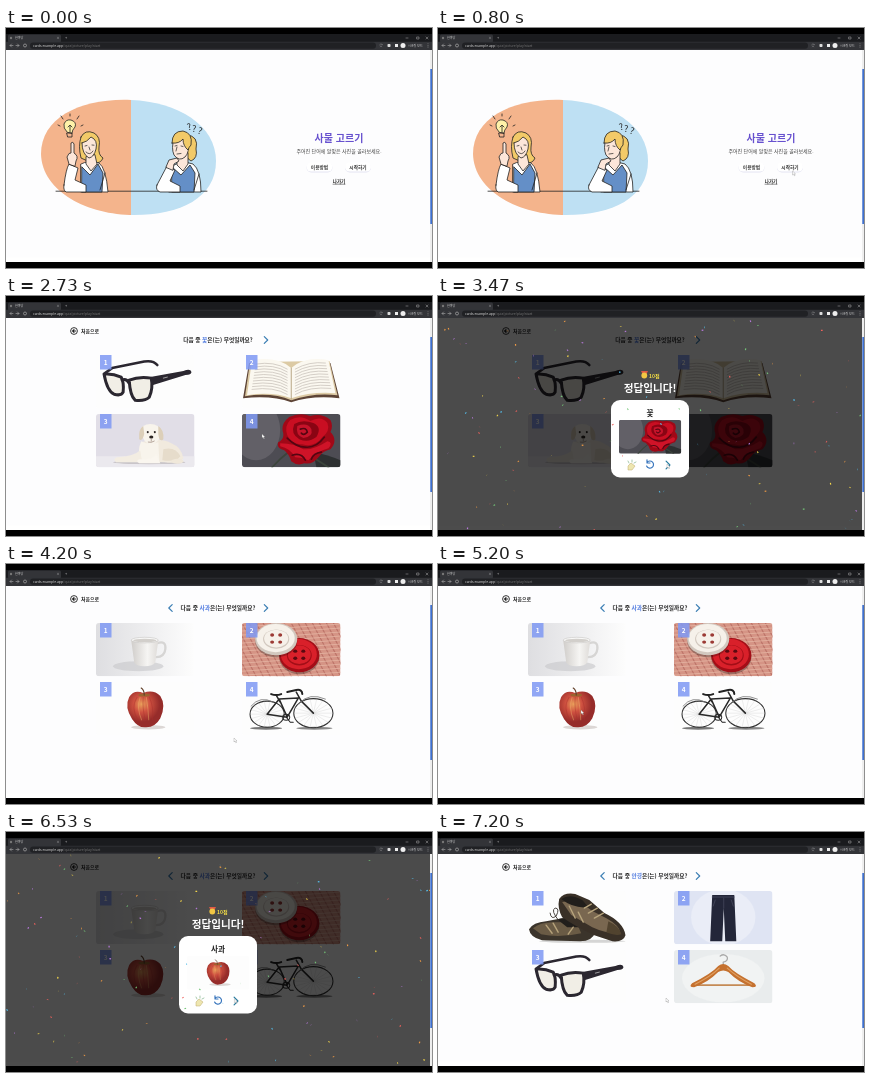
Write an HTML page that moves like this. It is 426 px wide and 240 px high and loops after 7270 ms.

```html
<!DOCTYPE html>
<html lang="ko">
<meta charset="utf-8">
<title>사물 고르기</title>
<style>
html, body { margin: 0; height: 100%; overflow: hidden; background: #000 }
svg { display: block; width: 100%; height: 100% }
text { font-family: "Noto Sans CJK KR", "Noto Sans CJK", "Noto Sans CJK JP", sans-serif }
.ink { stroke: #222; stroke-width: .8; stroke-linejoin: round; stroke-linecap: round }
</style>
<svg id="stage" viewBox="0 0 426 240"></svg>
<script>
const LOOP = 7270;
const stage = document.getElementById('stage');

const rect = (x, y, w, h, fill, r = 0, more = '') =>
  `<rect x="${x}" y="${y}" width="${w}" height="${h}" rx="${r}" fill="${fill}" ${more}/>`;
const oval = (x, y, rx, ry, fill, more = '') =>
  `<ellipse cx="${x}" cy="${y}" rx="${rx}" ry="${ry}" fill="${fill}" ${more}/>`;
const shape = (d, fill, more = '') => `<path d="${d}" fill="${fill}" ${more}/>`;
const line = (d, color, w = 1) =>
  shape(d, 'none', `stroke="${color}" stroke-width="${w}" stroke-linecap="round" stroke-linejoin="round"`);
const ink = (d, fill = 'none') => shape(d, fill, 'class="ink"');
const text = (x, y, size, s, fill = '#222', weight = 400, anchor = 'middle', more = '') =>
  `<text x="${x}" y="${y}" font-size="${size}" fill="${fill}" font-weight="${weight}" text-anchor="${anchor}" ${more}>${s}</text>`;
const group = (id, s, more = '') => `<g id="${id}" ${more}>${s}</g>`;
const repeat = (n, f) => Array.from({ length: n }, (_, i) => f(i)).join('');
const chevron = (x, y, dir, color = '#3c7fb4', size = 3.4) =>
  line(`M${x - dir * size / 2} ${y - size}l${dir * size} ${size}l${-dir * size} ${size}`, color, 1.2);

// Pictures fill a 98 x 53 card
const buttonDisc = (x, y, rx, ry, edge, face, hole) =>
  oval(x, y + 2, rx, ry, '#0004') + oval(x, y, rx, ry, edge) +
  oval(x - .5, y - 1, rx - 2, ry - 2, face) + oval(x, y, rx * .62, ry * .6, edge) +
  oval(x, y - .5, rx * .57, ry * .55, face) +
  repeat(4, i => oval(x + (i % 2 ? 4 : -4), y + (i > 1 ? 3 : -4), 2, 1.7, hole));

const bikeWheel = (x, y, rx, ry) =>
  oval(x, y, rx, ry, 'none', 'stroke="#333" stroke-width="1.1"') +
  repeat(9, i => {
    const a = i * Math.PI / 9, dx = rx * Math.cos(a), dy = ry * Math.sin(a);
    return line(`M${x - dx} ${y - dy}L${x + dx} ${y + dy}`, '#bbb', .25);
  });

const pictures = {
  glasses: rect(0, 0, 98, 53, '#fdfdfd') +
    line('M9 18L16 13L48 6.5Q57 5 61 10', '#2b2730', 2.6) +
    shape('M54 22L87 16Q94 13 95 17Q95 20 89 20L56 30Z', '#2b2730') +
    shape('M8 19Q16 18 25 22Q28 27 27 37Q25 41 18 39Q11 36 8 19ZM33 25Q43 21 55 23Q57 33 53 42Q49 46 39 45Q34 41 33 25Z',
      '#f1eee6', 'stroke="#2b2730" stroke-width="3" stroke-linejoin="round"') +
    line('M26 25Q30 23 33 28', '#2b2730', 3) + line('M67 23l4-1', '#bbb', .8),
  book: rect(0, 0, 98, 53, '#fdfdfd') +
    shape('M7 8L1 43Q30 40 49 47Q70 40 97 43L88 8Z', '#5d4436') +
    shape('M8 7L3 41Q30 37 49 45Q72 37 95 40L87 6Z', '#dccaa4') +
    shape('M10 5Q36 1 49 13V43Q30 36 5 40Z', '#fbf8f0') +
    shape('M49 13Q62 1 86 5L93 38Q70 36 49 43Z', '#fbf8f0') +
    repeat(10, i => {
      const y = 9 + i * 2.8, x = 14 - i * .45, r = 83 + i * .6;
      return line(`M${x} ${y}Q32 ${y - 3} 45 ${y + 5}M53 ${y + 5}Q67 ${y - 3} ${r} ${y - 1}`, '#c3bdb6', .7);
    }) + line('M49 13V44', '#ab9874', .8),
  dog: rect(0, 0, 98, 53, '#e1dee7') + rect(0, 42, 98, 11, '#ebe9ee') +
    oval(53, 48, 36, 2, '#c9c5c9') +
    shape('M45 28Q62 23 75 29Q85 33 87 44Q83 50 68 48L44 47Q41 37 45 28Z', '#f1eade') +
    shape('M67 35Q79 32 84 42Q80 48 66 46Z', '#e6dccb') +
    shape('M45 27Q54 32 62 28L63 46L44 47Q41 36 45 27Z', '#f8f4ec') +
    shape('M44 36Q38 42 21 43Q16 45 20 48L46 48Z', '#f3ede2') +
    shape('M60 40Q56 46 43 45Q39 47 43 49L64 49Z', '#faf6ef') +
    oval(81, 47, 6, 2.4, '#f0e8da') +
    shape('M44 17Q46 10 54 10Q63 10 65 18Q64 28 55 31Q47 29 44 17Z', '#f8f4ec') +
    shape('M47 12Q42 15 43 25Q46 28 48 20ZM62 12Q68 16 67 25Q63 29 62 20Z', '#dccfb9') +
    oval(51.5, 18, 1, 1.2, '#2c2523') + oval(58.5, 18, 1, 1.2, '#2c2523') +
    oval(55, 23, 2.1, 1.5, '#2c2523') + line('M55 25V27M52 28Q55 29 58 27', '#8b7368', .6),
  rose: rect(0, 0, 98, 53, '#4d4c53') + oval(14, 16, 24, 30, '#626067') +
    shape('M71 38Q84 40 98 46V53H74Z', '#2d3031') + line('M46 38Q38 44 30 53M72 44L86 53', '#3b443b', 1.8) +
    shape('M47 3Q58-2 68 2Q80-1 88 6Q91 12 88 18Q96 26 88 35Q80 37 77 42Q70 51 62 49Q55 52 49 47Q47 40 42 36Q34 34 36 28Q42 26 41 19Q38 10 47 3Z', '#a00817') +
    shape('M48 6Q58 0 68 7Q79 1 85 9Q88 17 80 23Q72 34 60 30Q49 31 45 21Q42 12 48 6Z', '#c90e22') +
    shape('M52 10Q60 5 71 9Q80 13 74 23Q66 29 57 25Q48 20 52 10Z', '#8a0413') +
    shape('M55 12Q65 8 69 15Q71 23 61 24Q53 21 55 12Z', '#c5132a') +
    shape('M38 29Q52 29 61 35Q71 36 85 27Q91 28 86 34Q74 37 66 46Q60 43 53 43Q48 34 38 32Z', '#cf1328') +
    line('M58 15Q64 13 65 18Q61 22 59 19M45 24Q54 33 63 33Q74 34 82 23M50 41Q59 38 63 46M69 45Q71 39 79 38', '#540511', 1.7),
  cup: rect(0, 0, 98, 53, 'url(#cupBack)') + oval(42, 43, 25, 5, '#c9c9cc', 'opacity=".65"') +
    line('M61 20Q70 17 69 26Q68 34 60 34', '#d6d5d4', 2.3) +
    shape('M35 17Q48 14 62 17L59 39Q57 43 48 43Q40 43 38 39Z', 'url(#cupSide)') +
    oval(48.5, 17, 13.5, 2.8, '#f8f8f7', 'stroke="#c9c7c5" stroke-width=".6"') +
    oval(48.5, 17.4, 11.5, 1.7, '#d2cfcb'),
  buttons: rect(0, 0, 98, 53, '#d59485') +
    repeat(18, i => line(`M${i * 7 - 28} 0l28 53`, '#bd7469', 1.2)) +
    repeat(15, i => line(`M0 ${i * 4}L98 ${i * 4 - 7}`, '#e5b4a3', .8)) +
    buttonDisc(57, 32, 20, 17, '#a30e17', '#d9202a', '#5c0910') +
    buttonDisc(34, 16, 21, 16, '#d2c8bf', '#f6f1ea', '#9c3a35'),
  apple: rect(0, 0, 98, 53, '#fdfdfd') + oval(52, 45, 17, 2.2, '#dcd7d5') +
    shape('M47 11Q38 7 33 15Q28 25 36 37Q42 46 50 45Q59 45 64 36Q70 23 64 14Q57 7 47 11Z', 'url(#appleSkin)') +
    repeat(5, i => shape(`M${41 + i * 3} 15Q${34 + i * 6} 26 ${42 + i * 3.5} 38`, 'none',
      `stroke="${i % 2 ? '#efbd70' : '#a92d2c'}" stroke-width="1" opacity=".4"`)) +
    oval(48, 13, 6, 1.5, '#9b642f') + line('M48 13Q48 8 45 6', '#62402b', 1.2),
  bike: rect(0, 0, 98, 53, '#fdfdfd') + oval(24, 46, 16, 1.4, '#777') + oval(72, 46, 18, 1.4, '#888') +
    bikeWheel(25, 32, 17, 13) + bikeWheel(71, 31, 19.5, 14.5) +
    line('M25 32L37 17L56 16L45 35L25 32M37 17L45 35M54 10L59 19L71 31M34 13L38 20', '#292929', 1.5) +
    line('M29 12Q34 14 39 12M45 10L54 8Q60 7 60 12', '#222', 2) +
    oval(44, 35, 3.5, 3, 'none', 'stroke="#292929"') + line('M44 35l4 5h3', '#222', 1) +
    line('M9 24Q18 13 31 20M57 21Q67 10 83 17', '#777', .8),
  shoes: rect(0, 0, 98, 53, '#fdfdfd') + oval(54, 50, 43, 1.6, '#d5d5d5') +
    shape('M1 38Q5 31 18 30L34 27Q48 25 56 33L67 41Q64 50 52 50L14 49Q2 46 1 38Z', '#3b342b') +
    shape('M5 37Q12 31 24 31L48 31L53 42Q31 47 13 43Z', '#6a5b45') +
    shape('M29 28Q42 25 52 31L53 36L39 36Z', '#211e1b') +
    line('M18 34l6 8M25 32l5 9M45 36l-5 7', '#b6a27a', 1.4) +
    line('M31 30Q22 19 27 17Q32 17 28 25Q23 29 22 22', '#39342e', .9) +
    shape('M31 8Q36 1 47 3L61 9L76 22Q95 31 97 44Q95 51 84 50L66 44Q47 35 34 26Q29 17 31 8Z', '#393027') +
    shape('M34 11L49 9L64 20L78 27Q91 34 92 42Q79 43 64 36L43 24Z', '#796750') +
    shape('M33 8Q42 2 54 9L60 16Q46 18 33 8Z', '#211e1b') +
    line('M56 17l7-4M60 22l9-5M66 27l9-5M41 15l6 12M50 21l5 10', '#b8a57d', 1.3) +
    shape('M80 30Q91 35 93 43Q87 45 78 41Z', '#51432f'),
  pants: rect(0, 0, 98, 53, '#dfe4f3') + oval(49, 26, 32, 28, '#eaedf7') +
    shape('M38 4H60L62 50H51L49.5 17L48 50H36Z', '#232639') +
    line('M38 6H60M49.5 7V17M41 9L39 15M57 9l2 6', '#4a4d63', .7),
  hanger: rect(0, 0, 98, 53, '#e9eced') + oval(49, 28, 41, 24, '#f1f3f3') +
    line('M49 17V12Q54 11 53 7Q50 3 46 6', '#aaa', 1.3) + line('M20 35H79', '#c58a55', 1.7) +
    shape('M44 16Q49 12 54 16Q60 23 80 33Q84 37 78 37Q65 33 54 22Q49 19 44 22Q33 33 20 37Q14 37 18 33Q37 24 44 16Z', '#c5712f') +
    line('M45 18Q37 26 21 34M53 18Q63 27 77 34', '#e0a062', 1.1)
};
const scaledPicture = (name, x, y, s = 1) =>
  `<g transform="translate(${x} ${y}) scale(${s})" clip-path="url(#card)">${pictures[name]}</g>`;

function quiz(word, names, back) {
  const cards = names.map((name, i) => {
    const x = i % 2 ? 236 : 90, y = i > 1 ? 118 : 59;
    return scaledPicture(name, x, y, 1.005) + rect(x + 4, y, 11.5, 14.5, '#7f99f4', 0, 'opacity=".86"') +
      text(x + 9.7, y + 10, 6.5, i + 1, '#fff', 700);
  }).join('');
  return oval(68, 35, 3.4, 3.4, 'none', 'stroke="#222" stroke-width=".9"') +
    line('M69.6 35H66.6M68 33.6L66.6 35L68 36.4', '#222', 1.1) +
    text(75, 36.8, 4.9, '처음으로', '#222', 700, 'start') +
    text(212, 46, 5.7, `다음 중 <tspan fill="#527ce0">${word}</tspan>은(는) 무엇일까요?`, '#222', 700) +
    (back ? chevron(164.5, 44, -1) : '') + chevron(260, 44, 1) + cards;
}

const modal = (word, name) =>
  rect(0, 22, 424, 212, '#000', 0, 'opacity=".7"') +
  shape('M203 75l2 4h3l2-4z', '#df5a45') + oval(206.3, 79.5, 2.9, 2.9, '#f1c644') +
  text(211, 81.5, 5, '10점', '#f5df45', 700, 'start') +
  text(212, 96, 10.6, '정답입니다!', '#fff', 700) +
  rect(173, 104, 78, 77.5, '#fff', 9) + text(212, 120, 7.6, word, '#222', 700) +
  scaledPicture(name, 181, 124, .635) +
  shape('M190 170l3-3 4 3-3 4h-4z', '#eee6b0', 'stroke="#bda96a" stroke-width=".5"') +
  line('M191 167l-1-2M194 166V164M196 167l2-1', '#83b48c', .7) +
  line('M209 166.5A3.6 3.6 0 1 1 208.6 170M209 163.8V167H212', '#3976bd', 1.2) +
  chevron(230, 169, 1, '#287b9f', 3.8);

function home() {
  const blob = 'M125 72C76 70 35 89 35 126C36 164 82 187 128 187C174 187 210 170 210 133C210 97 172 74 125 72Z';
  const bulb = line('M64 88V86M57 91L55 88M71 91L73 88M54 98L52 97M75 98L77 97', '#222', .8) +
    ink('M61 104Q57 100 58 96Q60 91 65 92Q71 94 69 99Q66 102 66 105Z', '#fff2a9') +
    ink('M61 105H66V109H62ZM62 99L64 97L66 99M64 98V104');
  const left =
    ink('M75 109Q79 101 88 105Q95 109 93 119Q92 127 97 130Q95 136 86 135L75 130Q72 118 75 109Z', '#f2ca68') +
    ink('M75 136Q82 132 93 135Q100 140 102 164H75Z', '#fff') +
    ink('M76 139L84 147L92 136L97 145L96 164H76Z', '#648fc7') +
    ink('M80 129L80 136L85 143L91 136L89 127Z', '#fce6d9') +
    ink('M76 115Q81 114 85 109Q92 112 90 121Q88 129 83 130Q76 126 76 115Z', '#fce6d9') +
    line('M79 118l2-.5M86 117l2 .2M83 119l1 3M80 124Q84 128 87 123', '#222', .7) +
    ink('M58 157Q60 141 63 136L72 140L69 152L80 157V164H60Q57 162 58 157Z', '#fff') +
    ink('M63 136L61 129Q63 124 65 125V115Q67 113 68 116V125Q73 128 70 133L69 138Z', '#fce6d9') +
    ink('M99 145L94 162');
  const right =
    ink('M181 107Q193 108 190 121Q192 130 185 133Q178 129 180 121Z', '#f2ca68') +
    ink('M166 138Q176 132 187 136Q195 142 195 164H163Z', '#fff') +
    ink('M166 139L175 147L184 137L189 145L188 164H166Z', '#648fc7') +
    ink('M171 128V137L177 143L182 136V125Z', '#fce6d9') +
    ink('M168 111Q174 106 182 113Q184 124 179 129Q173 134 168 127Q165 120 168 111Z', '#fce6d9') +
    ink('M166 115Q166 103 177 103Q187 105 185 117Q183 119 182 122Q177 118 177 111Q173 116 166 115Z', '#f2ca68') +
    line('M169 118l2-.5M175 118l2 .5M171 119l-1 4M171 126l4-.5', '#222', .7) +
    ink('M151 157L161 138L169 142L164 153L174 158V164H154Q149 162 151 157Z', '#fff') +
    ink('M160 139L163 132L171 130L173 133L168 136L167 142Z', '#fce6d9') +
    ink('M193 146L188 162');
  const marks = [[184, 102, -15], [188, 104, 5], [193, 106, 18]].map(([x, y, a]) =>
    text(x, y, 9, '?', '#222', 400, 'middle', `transform="rotate(${a} ${x} ${y})"`)).join('');
  const pill = (x, s) => rect(x - 13, 135, 26, 9.5, '#e4e4f2', 4.7) +
    rect(x - 13, 134.5, 26, 9, '#fff', 4.5) + text(x, 140.8, 4.7, s, '#333', 700);
  return `<clipPath id="blob"><path d="${blob}"/></clipPath>` +
    `<g clip-path="url(#blob)">${rect(30, 70, 95, 120, '#f4b48c')}${rect(125, 70, 90, 120, '#bee0f3')}</g>` +
    line('M50 163.2H201', '#222', .8) + bulb + left + right + marks +
    text(333, 114, 10, '사물 고르기', '#6751cf', 700) +
    text(333, 125.2, 5, '주어진 단어에 알맞은 사진을 골라보세요.', '#444') +
    pill(313.5, '이용방법') + pill(352, '시작하기') +
    text(333, 155, 4.5, '나가기', '#222', 700) + line('M327 156.2H339', '#222', .5);
}

const browser =
  rect(0, 6, 426, 7.5, '#1a1b1e') + rect(2, 6.5, 53, 8, '#333438', 1.5) +
  oval(5, 10, 1.2, 1.2, '#777') + text(9, 11, 3, '한마당', '#ccc', 400, 'start') +
  text(52, 11, 3.5, '×', '#bbb') + text(60, 11, 4, '+', '#bbb') +
  rect(0, 13.5, 426, 8.5, '#333438') + rect(24, 14.5, 346, 6.3, '#202124', 3) +
  line('M7 17.5H4L5.5 16M4 17.5L5.5 19M10 17.5H13L11.5 16M13 17.5L11.5 19', '#aaa', .6) +
  oval(19, 17.5, 1.5, 1.5, 'none', 'stroke="#bbb" stroke-width=".6"') +
  text(27, 18.7, 3.4, 'cards.example.app<tspan fill="#777">/quiz/picture/play/start</tspan>', '#ddd', 400, 'start') +
  text(375, 19, 4, '☆', '#bbb') + rect(381.5, 16, 3, 3, '#ddd', .7) + rect(389, 16, 3, 3, '#eee') +
  oval(397, 17.5, 2.5, 2.5, '#eee') + text(402, 18.7, 3, '시크릿 모드', '#ddd', 400, 'start') +
  repeat(3, i => oval(422, 15.8 + i * 1.6, .4, .4, '#ccc')) +
  line('M400 10h2M411 9h2v2h-2zM420 9l2 2M422 9l-2 2', '#aaa', .5);

const pieceCount = 120;
const rnd = n => { const v = Math.sin(n * 91.37 + 17.1) * 43758.5453; return v - Math.floor(v); };
const colors = ['#f6d84b', '#ef615d', '#55bce8', '#74c578', '#b779db', '#ef9a45'];

stage.innerHTML = `<defs>
  <clipPath id="card"><rect width="98" height="53" rx="3"/></clipPath>
  <clipPath id="page"><rect y="22" width="424" height="212"/></clipPath>
  <linearGradient id="cupBack"><stop stop-color="#dedee1"/><stop offset="1" stop-color="#fdfdfd"/></linearGradient>
  <linearGradient id="cupSide"><stop stop-color="#d0cdca"/><stop offset=".6" stop-color="#f6f5f3"/><stop offset="1" stop-color="#dedbd8"/></linearGradient>
  <radialGradient id="appleSkin" cx=".4" cy=".35"><stop stop-color="#e9a05b"/><stop offset=".45" stop-color="#cf5140"/><stop offset="1" stop-color="#962c2a"/></radialGradient>
  </defs>` +
  rect(0, 0, 426, 240, '#000') + browser + rect(0, 22, 426, 212, '#fdfdfe') +
  rect(0, 229.5, 424, 4.5, '#fff') +
  group('home', home()) +
  group('flowerQuiz', quiz('꽃', ['glasses', 'book', 'dog', 'rose'])) +
  group('appleQuiz', quiz('사과', ['cup', 'buttons', 'apple', 'bike'], true)) +
  group('glassesQuiz', quiz('안경', ['shoes', 'pants', 'glasses', 'hanger'], true)) +
  group('flowerModal', modal('꽃', 'rose')) + group('appleModal', modal('사과', 'apple')) +
  group('confetti', repeat(pieceCount, i => rect(-.8, -.6, 1.7, 1.2, colors[i % 6])), 'clip-path="url(#page)"') +
  rect(424, 22, 2, 212, '#eee') + rect(424.3, 41, 1.7, 155, '#3d6fd0') +
  group('cursor', shape('M0 0L0 4L1 3.1L1.8 4.8L2.5 4.5L1.8 2.9H3Z', '#fff', 'stroke="#777" stroke-width=".3"'));

const spans = {
  home: [0, 1270], flowerQuiz: [1270, 3900], appleQuiz: [3900, 6800], glassesQuiz: [6800, LOOP],
  flowerModal: [2900, 3900], appleModal: [5400, 6800]
};
const parts = Object.fromEntries([...Object.keys(spans), 'confetti', 'cursor']
  .map(id => [id, document.getElementById(id)]));
const pieces = [...parts.confetti.children];
const show = (part, on) => part.style.display = on ? '' : 'none';

// Pointer stops: time, x, y
const stops = [[0, 427, 200], [900, 352, 141], [1270, 352, 141], [1600, 339, 146], [2450, 256, 138],
  [2900, 256, 138], [3400, 229, 168], [3900, 229, 168], [4200, 228, 174], [4700, 143, 146],
  [5400, 143, 146], [6200, 229, 168], [6800, 228, 166], [LOOP, 228, 166]];

function pointer(t) {
  const i = Math.max(1, stops.findIndex(s => s[0] > t));
  const [t0, x0, y0] = stops[i - 1], [t1, x1, y1] = stops[i];
  const p = (t - t0) / (t1 - t0), e = p * p * (3 - 2 * p);
  return `translate(${x0 + (x1 - x0) * e} ${y0 + (y1 - y0) * e})`;
}

function draw(now) {
  const t = now % LOOP;
  const active = id => t >= spans[id][0] && t < spans[id][1];
  for (const id in spans) show(parts[id], active(id));
  const modalId = ['flowerModal', 'appleModal'].find(active);
  show(parts.confetti, modalId);
  if (modalId) {
    const age = (t - spans[modalId][0]) / 1000;
    pieces.forEach((piece, i) => {
      const x = rnd(i) * 424 + Math.sin(age * 3 + i) * 5;
      const y = 20 + (rnd(i + 300) * 216 + age * (50 + rnd(i + 600) * 50)) % 216;
      piece.setAttribute('transform', `translate(${x} ${y}) rotate(${i * 47 + age * 300}) scale(1 ${.55 + .45 * Math.cos(age * 8 + i)})`);
    });
  }
  parts.cursor.setAttribute('transform', pointer(t));
  requestAnimationFrame(draw);
}
requestAnimationFrame(draw);
</script>
</html>
```
